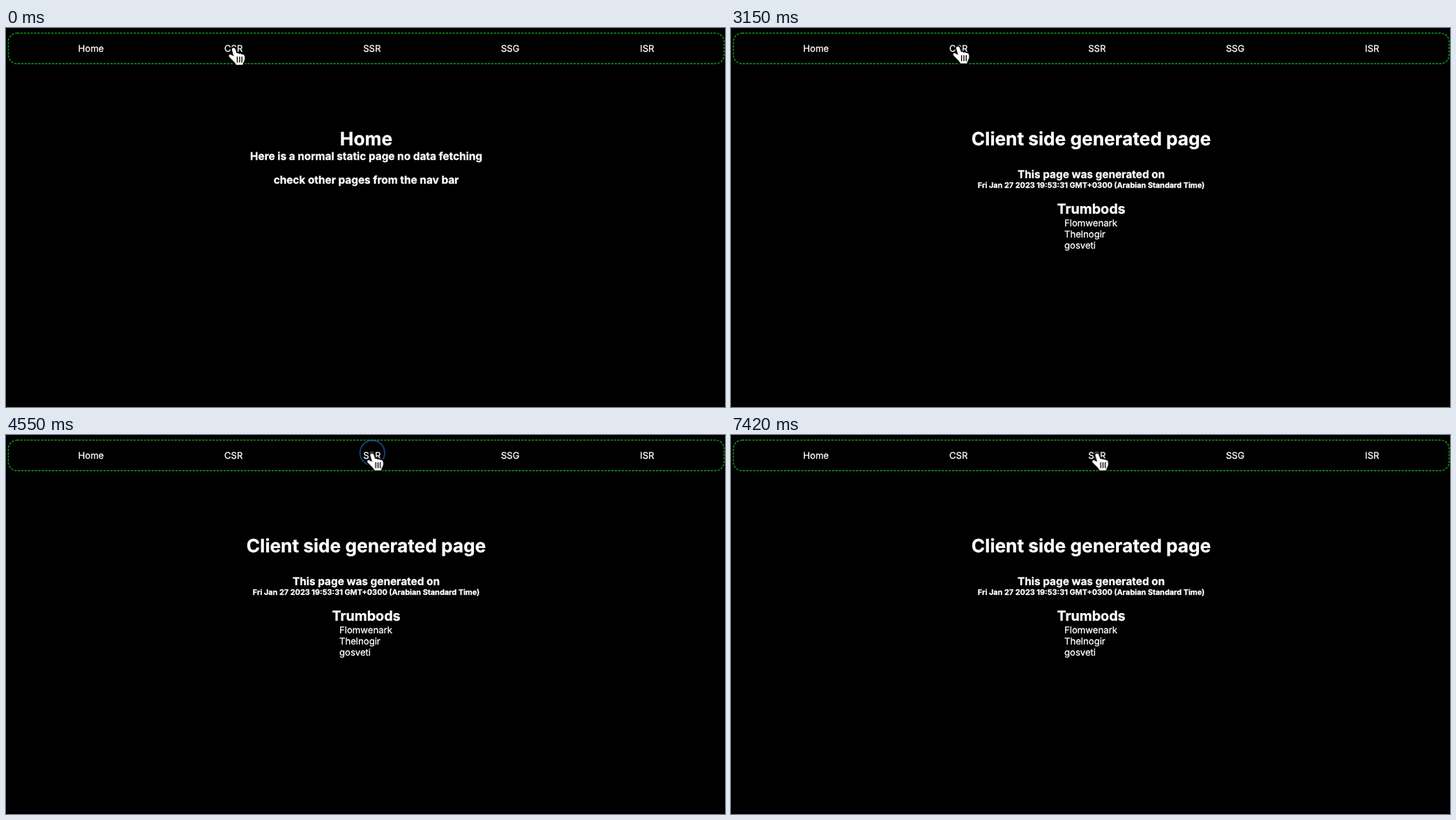
Animation, 1031 px wide and 543 px high, one loop 8000 ms. Source, as an HTML page:

```html
<!DOCTYPE html>
<html lang="en">
<head>
<meta charset="utf-8">
<title>Rendering modes</title>
<style>
  html, body { margin: 0; width: 100%; height: 100%; overflow: hidden; background: #000; }
  svg { display: block; width: 100vw; height: 100vh; }
  text {
    fill: #fff; stroke: #fff; stroke-width: .3;
    font: 13.12px Inter, sans-serif; font-optical-sizing: none;
    text-anchor: middle; text-rendering: geometricPrecision;
  }
  .h1, .h2, .h3, .h5 { font-weight: 700; }
  .h1 { font-size: 26.24px; }
  .h2 { font-size: 19.68px; }
  .h3 { font-size: 15.35px; }
  .h5 { font-size: 10.89px; }
  .serif { font-family: "Liberation Serif", "Times New Roman", serif; }
  .list text { text-anchor: start; }
  .bar { fill: none; stroke: #118a1c; stroke-width: 1.64; stroke-dasharray: 3.28 1.64; }

  .anim { animation: 8s step-end infinite; }
  #home { animation-name: home; }
  #loading { animation-name: loading; }
  #page { animation-name: page; }
  #cursor { animation-name: move; }
  #hand { animation-name: hand; }
  #arrow { animation-name: arrow; }
  #ring { fill: none; stroke: #2264c4; stroke-width: 2; animation-name: ring; }

  @keyframes home { 0% { visibility: visible } 21.875%, 100% { visibility: hidden } }
  @keyframes loading {
    0% { visibility: hidden } 21.875% { visibility: visible } 39.375%, 100% { visibility: hidden }
  }
  @keyframes page { 0% { visibility: hidden } 39.375%, 100% { visibility: visible } }
  @keyframes hand {
    0% { visibility: visible } 47.25% { visibility: hidden } 49.875%, 100% { visibility: visible }
  }
  @keyframes arrow {
    0% { visibility: hidden } 47.25% { visibility: visible } 49.875%, 100% { visibility: hidden }
  }
  @keyframes move {
    0% { transform: translate(326px, 28px) }
    0.875% { transform: translate(325px, 25.5px) }
    1.75% { transform: translate(324.5px, 24.5px) }
    5.25% { transform: translate(324.5px, 25px) }
    6.125% { transform: translate(325px, 25px) }
    7.875% { transform: translate(325px, 25.5px) }
    8.75% { transform: translate(325px, 26px) }
    47.25% { transform: translate(398px, 22px) }
    48.125% { transform: translate(466px, 20.5px) }
    49% { transform: translate(504px, 21px) }
    49.875% { transform: translate(521px, 22.5px) }
    50.75% { transform: translate(527px, 24px) }
    51.625% { transform: translate(527px, 25px) }
    52.5% { transform: translate(526px, 25.5px) }
    53.375% { transform: translate(525px, 26px) }
    54.25%, 100% { transform: translate(524.5px, 26px) }
  }
  @keyframes ring {
    0% { r: 0; opacity: 0 }
    56% { r: 13px; opacity: .8 }
    56.875% { r: 17.7px; opacity: .62 }
    57.75% { r: 21px; opacity: .45 }
    58.625% { r: 24px; opacity: .28 }
    59.5% { r: 26.5px; opacity: .12 }
    60.375%, 100% { r: 0; opacity: 0 }
  }
</style>
</head>
<body>
<svg viewBox="0 0 1031 543">
  <rect class="bar" x="3.4" y="7.4" width="1026.3" height="43.7" rx="12.3"/>
  <g>
    <text x="121.9" y="34">Home</text>
    <text x="326.2" y="34">CSR</text>
    <text x="524.8" y="34">SSR</text>
    <text x="723" y="34">SSG</text>
    <text x="919.3" y="34">ISR</text>
  </g>

  <g id="home" class="anim">
    <text class="h1" x="516.5" y="168">Home</text>
    <text class="h3" x="516.5" y="189">Here is a normal static page no data fetching</text>
    <text class="h3" x="516.5" y="223">check other pages from the nav bar</text>
  </g>

  <g id="loading" class="anim">
    <text class="h1 serif" x="517" y="167">Loading ....</text>
  </g>

  <g id="page" class="anim">
    <text class="h1" x="516.5" y="168">Client side generated page</text>
    <text class="h3" x="516.5" y="215">This page was generated on</text>
    <text class="h5" x="516.5" y="229">Fri Jan 27 2023 19:53:31 GMT+0300 (Arabian Standard Time)</text>
    <text class="h2" x="516.5" y="266">Trumbods</text>
    <g class="list">
      <text x="478" y="284">Flomwenark</text>
      <text x="478" y="300">Thelnogir</text>
      <text x="478" y="316">gosveti</text>
    </g>
  </g>

  <circle id="ring" class="anim" cx="525.3" cy="25.5" r="0"/>

  <g id="cursor" class="anim">
    <g id="hand" class="anim">
      <g transform="translate(-7 -1)">
        <path fill="#fff" stroke="#000" stroke-width="3.6" stroke-linejoin="round" paint-order="stroke"
          d="M6.2 1.8C7.6.9 9.2 1.5 9.8 3.2L12 9.4C13 8.6 14.8 8.8 15.2 10.2C16.4 9.2 18.5 9.6 19 11C20.4 10.3 22.4 11 22.9 12.8C23.8 15.5 23.6 18 22.4 20.5C21.3 22.6 20.7 24 20.4 25.7H11C10 23.2 8 21.6 6 19.3L1 14.2C-.4 12.2 1.6 10.3 3.8 11.4L7.6 13.4L5 4.6C4.6 3.2 5.2 2.4 6.2 1.8Z"/>
        <path fill="none" stroke="#000" stroke-width="1.4" stroke-linecap="round" d="M12.6 14.5V22M16 14.5V22M19.3 14.5V22"/>
      </g>
    </g>
    <g id="arrow" class="anim">
      <path fill="#000" stroke="#fff" stroke-width="2"
        d="M1 2.4V25.2L6.3 20.4L10.4 30L14.6 28.2L10.6 18.9H17.6Z"/>
    </g>
  </g>
</svg>
</body>
</html>
```
